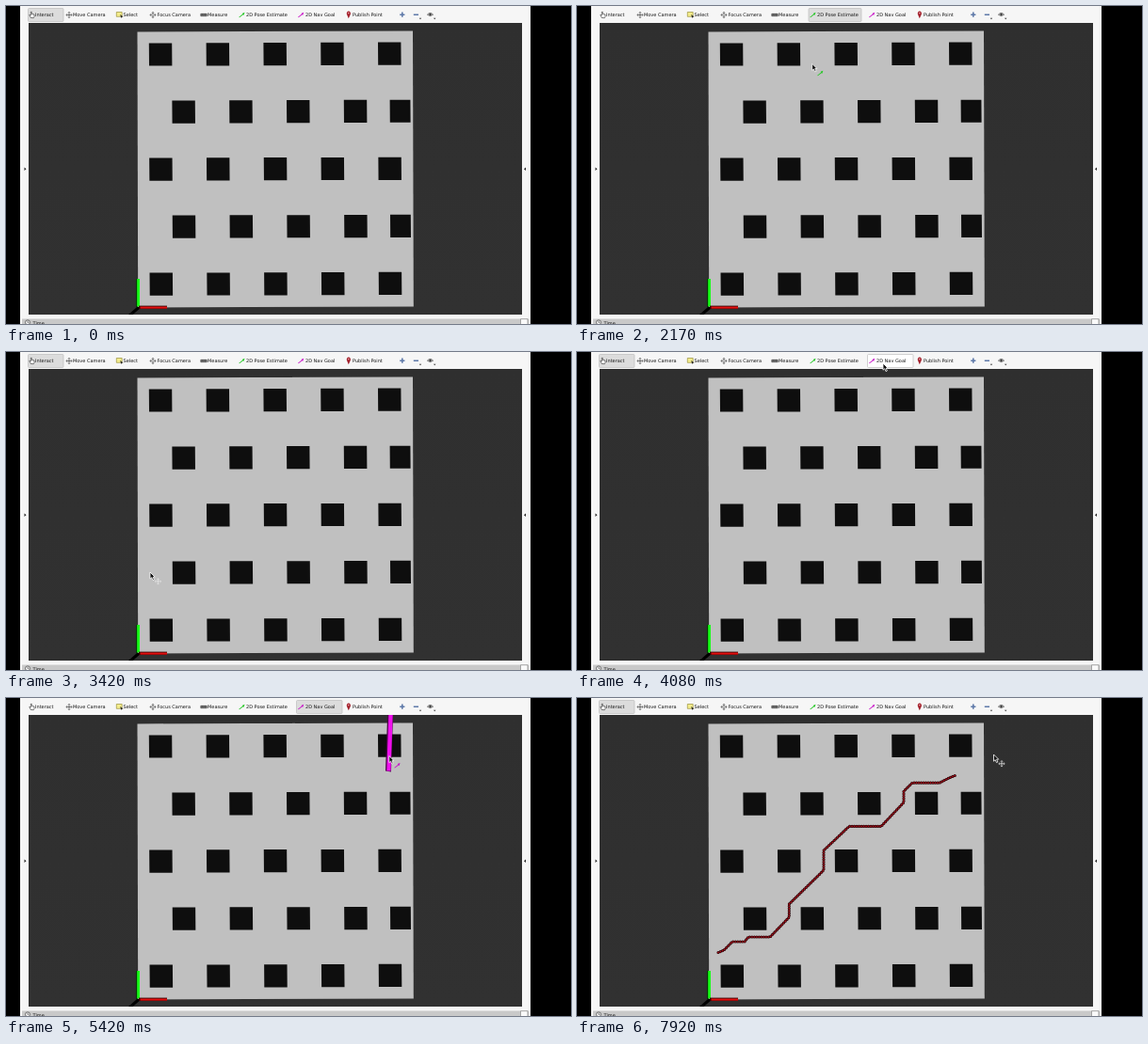
An HTML page that plays this animation: 600 by 338 pixels, repeating every 8000 ms.

```html
<!DOCTYPE html>
<html lang="en">
<head>
<meta charset="utf-8">
<style>
html, body { margin: 0; height: 100%; overflow: hidden; background: #000; }
svg { display: block; width: 100vw; height: 100vh; }
text { font: 5px "DejaVu Sans", sans-serif; fill: #161616; }
</style>
</head>
<body>
<svg viewBox="0 0 600 338" preserveAspectRatio="none">
  <defs>
    <linearGradient id="shade" x2="0" y2="1">
      <stop stop-color="#2f2f2f"/><stop offset="1" stop-color="#313131"/>
    </linearGradient>
    <clipPath id="view"><path d="M24 18H548V328H24z"/></clipPath>
    <g id="cross" fill="none">
      <path d="M-3 0H3M0-3V3" stroke-width=".8"/>
      <path d="M-1.2-2L0-3.3 1.2-2M-1.2 2L0 3.3 1.2 2M-2-1.2L-3.3 0-2 1.2M2-1.2L3.3 0 2 1.2" stroke-width=".6"/>
    </g>
    <path id="dart" d="M-3 2.6L1 -.6 .4 -1.3 3.2 -2.4 2.3 .6 1.6 .1 -2.4 3.1z"/>
  </defs>

  <path fill="#f6f6f6" d="M15 0H557V338H15z"/>
  <path fill="url(#shade)" d="M24 18H548V328H24z"/>
  <path fill="#c9c9c9" d="M17 332.5H555V338H17z"/>
  <path fill="#fafafa" stroke="#777" stroke-width=".6" d="M546.5 332.7H554V339H546.5z"/>
  <circle cx="23" cy="336.3" r="2.5" fill="#eee" stroke="#444" stroke-width=".7"/>
  <path stroke="#444" stroke-width=".6" fill="none" d="M23 334.6V336.4H24.4"/>
  <text x="28.5" y="338.6">Time</text>
  <path fill="#222" d="M19.5 171.5L21.5 173.3 19.5 175zM552 171.5L550 173.3 552 175z"/>

  <g id="buttons"></g>
  <g id="labels"></g>

  <path fill="#fff" stroke="#222" stroke-width=".6" d="M26.3 12.5L24.8 9.5 26.3 9.8V6.3H27.3V8.5L30 9V11.3L29.3 12.7z"/>
  <use href="#cross" x="67" y="9.5" stroke="#555"/>
  <path fill="#f4ec8c" stroke="#8a8128" stroke-width=".6" d="M117.3 6.5H123.2V11.3H117.3z"/>
  <path fill="#222" d="M121.3 9L124.4 11.6 122.9 11.8 122.2 13z"/>
  <use href="#cross" x="156" y="9.5" stroke="#555"/>
  <circle cx="156" cy="9.5" r="1.3" fill="#f6f6f6" stroke="#555" stroke-width=".6"/>
  <path fill="#777" stroke="#333" stroke-width=".6" d="M206.8 8.3H213.2V10.7H206.8zM208.4 8.3V9.5M210 8.3V9.5M211.6 8.3V9.5"/>
  <use href="#dart" x="250.3" y="9.2" fill="#28c828"/>
  <use href="#dart" x="313" y="9.2" fill="#c814c8"/>
  <path fill="#a3202c" d="M363.8 13.2L362 9A2.1 2.3 0 1 1 365.7 9z"/>
  <circle cx="363.8" cy="7.6" r=".8" fill="#e9a5aa"/>
  <path stroke="#5d78a8" stroke-width="1.6" d="M418.2 9.2H423.4M420.8 6.6V11.8M432.8 9.2H438"/>
  <path fill="#eee" stroke="#444" stroke-width=".7" d="M447.4 9.2Q450.5 5.7 453.6 9.2 450.5 12 447.4 9.2z"/>
  <circle cx="450.5" cy="9" r="1.2" fill="#333"/>
  <path fill="#333" d="M438.8 12.8H441.2L440 14.2zM454 12.8H456.4L455.2 14.2z"/>

  <g clip-path="url(#view)">
    <path fill="#c0c0c0" d="M139.5 27.4L432 26.5 432.8 319.4 140.2 320.4z"/>
    <path id="blocks" fill="#0e0e0e"/>
    <path fill="#000" d="M130 328L139 320H144L134 328.5z"/>
    <path fill="#063c06" d="M138 290H140V320H138z"/>
    <path fill="#1aff1a" d="M139.2 290H142V319.3H139.2z"/>
    <path fill="#300" d="M141 318.6H171V322H141z"/>
    <path fill="#e51212" d="M142.5 319.5H171V321.6H142.5z"/>
    <g id="route" fill="none" stroke-linecap="round" stroke-linejoin="round"></g>
    <g id="arrow">
      <path id="side" d="M-3.2 0V-62H-6.6L-.6-75.5 5.6-62H2.8V1z"/>
      <path id="face" d="M-1.9 0V-61.6H-4.6L0-74 5.2-62.4H2.4V0z"/>
    </g>
  </g>

  <g id="cursor">
    <path fill="#111" stroke="#fff" stroke-width=".8" d="M0 0V7.2L1.7 5.7 3 8.6 4.4 8 3.1 5.2H5.2z"/>
    <use id="tool" x="8.5" y="9.8" stroke-width=".5"/>
  </g>
</svg>
<script>
const $ = id => document.getElementById(id);
const FPS = 12, LOOP = 8000;

const labels = [[31, 'Interact'], [71, 'Move Camera'], [124.5, 'Select'], [160.5, 'Focus Camera'],
  [214, 'Measure'], [255, '2D Pose Estimate'], [318, '2D Nav Goal'], [368, 'Publish Point']];
$('labels').innerHTML = labels.map(([x, s]) => `<text x="${x}" y="11.2">${s}</text>`).join('');

const buttons = { interact: [23.5, 37.5], pose: [246, 56], nav: [308.5, 48.5] };
for (const [id, [x, w]] of Object.entries(buttons))
  $('buttons').innerHTML += `<rect id="${id}" x="${x}" y="2.5" width="${w}" height="14" rx="1" stroke="#bdbdbd" stroke-width=".7"/>`;

let blocks = '';
for (let row = 0; row < 5; row++)
  for (let col = 0; col < 5; col++) {
    const odd = row % 2, last = odd && col === 4;
    const x = last ? 407.4 + row * .2 : 151.8 + col * 60.8 + row * .18 + odd * 24.4;
    const y = 39.4 + row * 61.05 - col * .2;
    blocks += `M${x} ${y}h${last ? 21.8 : 24.4}l.2 24.2h${last ? -21.8 : -24.4}z`;
  }
$('blocks').setAttribute('d', blocks);

const route = 'M150 270.5L156 268 165 259H178L182 254H205L225.3 233V219L262 183V162L289 136.4H323L347 111V99L356 90.2H385L396 84.5 402.5 82';
$('route').innerHTML = [['#2a0508', 3.2], ['#b0101c', 1.7]].map(([color, w]) =>
  `<path d="${route}" stroke="${color}" stroke-width="${w}" stroke-dasharray="0 2.5"/>`).join('');

// Pointer keys: step, x, y
const keys = [[13, 486, 230], [15, 405, 112], [17, 305, 10], [18, 275, -6], [20, 270, 4], [22, 273, 11],
  [25, 272, 12], [28, 205, 160], [31, 153, 264], [34, 151.5, 269], [36, 152, 258], [39, 152, 236],
  [41, 153, 234], [44, 230, 130], [47, 315, 20], [49, 325, 12], [52, 326, 11], [55, 380, 62],
  [58, 405, 90], [60, 406, 79], [66, 407, 58], [68, 414, 58], [70, 436, 60], [71, 442.5, 60]];

function pointer(step) {
  const i = keys.findIndex(k => k[0] > step);
  if (i < 0) return keys.at(-1).slice(1);
  const [a, ax, ay] = keys[Math.max(0, i - 1)], [b, bx, by] = keys[i];
  const u = Math.max(0, (step - a) / (b - a));
  return [ax + (bx - ax) * u, ay + (by - ay) * u];
}

const show = (id, on) => $(id).setAttribute('visibility', on ? 'visible' : 'hidden');
const within = (n, from, to) => n >= from && n < to;

function draw(ms) {
  const step = Math.floor((ms + 4) * FPS / 1000);
  const mode = within(step, 24, 41) ? 'pose' : within(step, 52, 67) ? 'nav' : 'interact';
  const hover = within(step, 20, 24) ? 'pose' : within(step, 47, 52) ? 'nav' : '';
  for (const id in buttons) {
    show(id, id === mode || id === hover);
    $(id).setAttribute('fill', id === mode ? '#dcdcdc' : '#fff');
  }

  const [x, y] = pointer(step);
  $('cursor').setAttribute('transform', `translate(${x} ${y})`);
  show('cursor', step >= 13);
  show('tool', step >= 13 && y > 18);
  $('tool').setAttribute('href', mode === 'interact' ? '#cross' : '#dart');
  $('tool').setAttribute('fill', mode === 'pose' ? '#28c828' : '#c814c8');
  $('tool').setAttribute('stroke', mode === 'interact' ? '#e4e4e4' : 'none');

  const posing = within(step, 33, 41);
  show('arrow', posing || within(step, 60, 67));
  $('arrow').setAttribute('transform', posing ? 'translate(151.5 269)' : 'translate(406.2 77.5) rotate(2)');
  $('side').setAttribute('fill', posing ? '#0a5a05' : '#4a0648');
  $('face').setAttribute('fill', posing ? '#1cf50c' : '#f010ee');
  show('route', step >= 93);
}

function tick() {
  draw(performance.now() % LOOP);
  requestAnimationFrame(tick);
}
tick();
</script>
</body>
</html>
```
